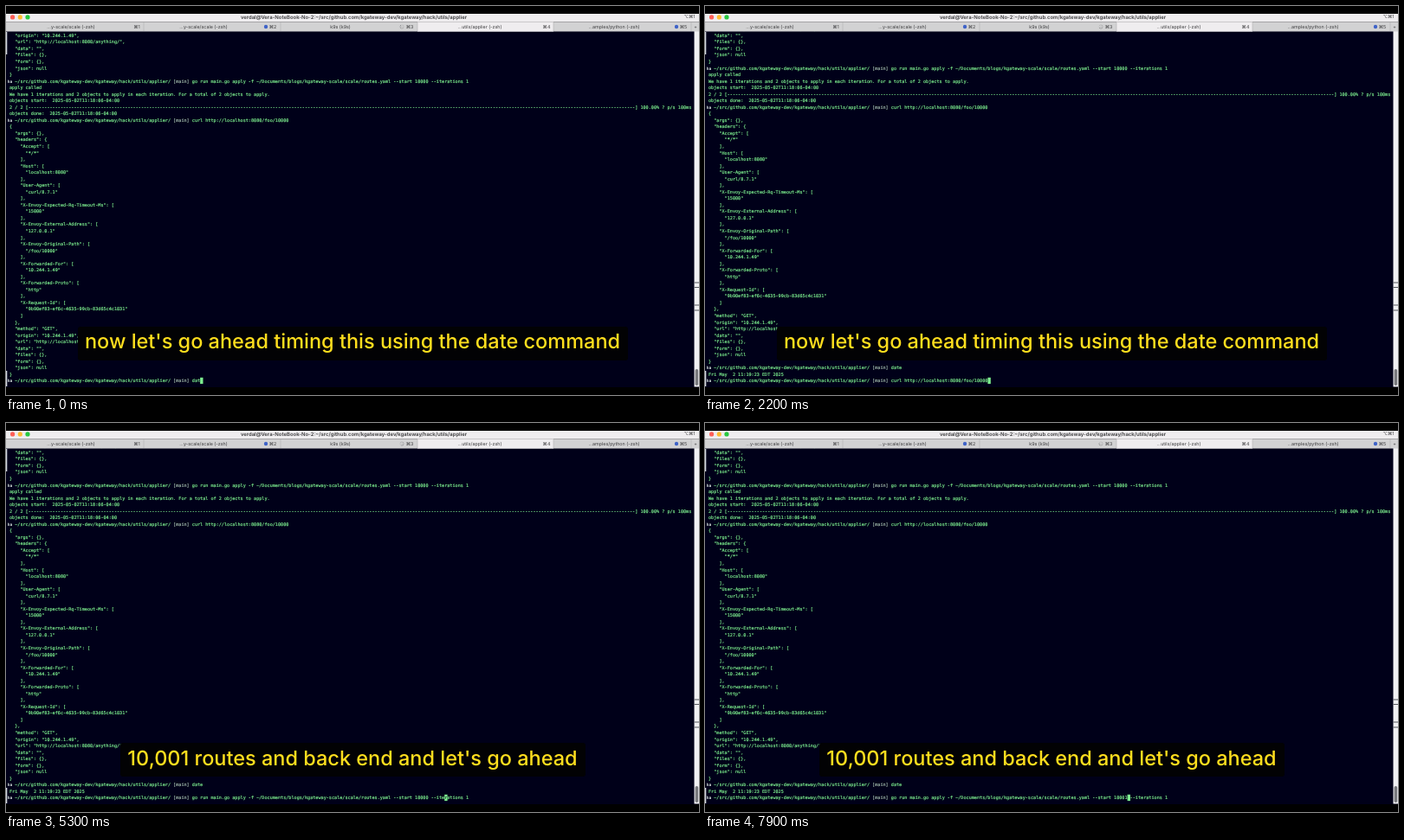
Write an HTML page that moves like this. It is 800 px wide and 450 px high and loops after 8 s.

```html
<!DOCTYPE html>
<html lang="en">
<head>
<meta charset="utf-8">
<title>Terminal</title>
<style>
html, body { margin: 0; width: 100%; height: 100%; overflow: hidden; background: #000; }
svg { display: block; width: 800px; height: 450px; }
text { white-space: pre; text-rendering: geometricPrecision; }
/* Terminal text is set ten times larger and scaled down for exact advances */
.term { font: 51.49px "DejaVu Sans Mono", monospace; fill: #7df08f; stroke: #7df08f; stroke-width: 1.6px; }
.branch { fill: #9fb8a8; stroke: #9fb8a8; }
.mark { font-size: 46px; font-weight: 700; fill: #d8e4e0; stroke: none; }
.under { fill: #000019; stroke: none; }
.ui { font: 5.35px Inter, sans-serif; fill: #3c3c3e; text-anchor: middle; }
.title { font-size: 5.95px; font-weight: 600; }
.caption { font: 500 23.5px Inter, sans-serif; fill: #ffde1e; text-anchor: middle; }
</style>
</head>
<body>
<svg id="stage" viewBox="0 0 800 450"></svg>
<script>
const LOOP = 8000, CW = 3.1, LH = 7.54, X0 = 4, Y0 = 35.8, LAST = 53;
const PATH = '~/src/github.com/kgateway-dev/kgateway/hack/utils/applier/';
const CMD_COL = 2 + PATH.length + 8;
const APPLY = 'go run main.go apply -f ~/Documents/blogs/kgateway-scale/scale/routes.yaml --start 10000 --iterations 1';
const CURL = 'curl http://localhost:8080/foo/10000';

const stage = document.getElementById('stage');

function add(parent, tag, attrs = {}, text) {
  const el = document.createElementNS('http://www.w3.org/2000/svg', tag);
  for (const k in attrs) el.setAttribute(k, attrs[k]);
  if (text !== undefined) el.textContent = text;
  parent.appendChild(el);
  return el;
}
const rect = (p, x, y, width, height, fill, rx = 0) => add(p, 'rect', { x, y, width, height, fill, rx });
const dot = (p, cx, cy, r, fill) => add(p, 'circle', { cx, cy, r, fill });
const label = (p, x, y, text, cls = '') => add(p, 'text', { x, y, class: 'ui ' + cls }, text);
const col = n => X0 + n * CW;
const rowY = n => Y0 + n * LH;
const place = (x, n) => `translate(${x} ${rowY(n)}) scale(.1)`;

function line(parent, n, text, x = X0, cls = '') {
  return add(parent, 'text', { transform: place(x, n), class: 'term ' + cls }, text);
}

// Prompt row; returns the element holding the command
function prompt(parent, n, cmd) {
  line(parent, n, 'ha', 1.8, 'mark');
  const t = line(parent, n, '', col(2));
  add(t, 'tspan', {}, PATH);
  add(t, 'tspan', { class: 'branch' }, ' [main] ');
  return add(t, 'tspan', {}, cmd);
}

// Terminal history
const header = (name, value) => [`    "${name}": [`, `      "${value}"`, '    ],'];
const tail = [
  '  "origin": "10.244.1.49",', '  "url": "http://localhost:8080/anything/",',
  '  "data": "",', '  "files": {},', '  "form": {},', '  "json": null', '}'
];
const log = [
  ...tail,
  { cmd: APPLY },
  'apply called',
  'We have 1 iterations and 2 objects to apply in each iteration. For a total of 2 objects to apply.',
  'objects start:  2025-05-02T11:18:06-04:00',
  '2 / 2 [' + '-'.repeat(226) + '] 100.00% ? p/s 100ms',
  'objects done:  2025-05-02T11:18:06-04:00',
  { cmd: CURL },
  '{', '  "args": {},', '  "headers": {',
  ...header('Accept', '*/*'),
  ...header('Host', 'localhost:8080'),
  ...header('User-Agent', 'curl/8.7.1'),
  ...header('X-Envoy-Expected-Rq-Timeout-Ms', '15000'),
  ...header('X-Envoy-External-Address', '127.0.0.1'),
  ...header('X-Envoy-Original-Path', '/foo/10000'),
  ...header('X-Forwarded-For', '10.244.1.49'),
  ...header('X-Forwarded-Proto', 'http'),
  ...header('X-Request-Id', '9b90ef83-ef6c-4635-99cb-83d65c4c1031').slice(0, 2), '    ]',
  '  },', '  "method": "GET",',
  ...tail
];
const dateRows = [{ cmd: 'date' }, 'Fri May  2 11:19:23 EDT 2025'];

rect(stage, 0, 0, 800, 450, '#000');
rect(stage, 0, 29, 800, 412, '#000019');
const clip = add(add(stage, 'defs'), 'clipPath', { id: 'screen' });
rect(clip, 0, 29.5, 794, 411, '#fff');
const screen = add(stage, 'g', { 'clip-path': 'url(#screen)' });
const history = add(screen, 'g');
const fresh = add(history, 'g');
const put = (g, item, n) => item.cmd ? prompt(g, n, item.cmd) : line(g, n, item);
log.forEach((item, n) => put(history, item, n));
dateRows.forEach((item, n) => put(fresh, item, LAST + n));
const live = prompt(screen, LAST, '');
const cursor = rect(screen, 0, rowY(LAST) - 5.6, 3.4, 7.3, '#7df08f');
const under = line(screen, LAST, '', 0, 'under');

// Window edges
rect(stage, 0, 30, 1.3, 26, '#d5dae0');
rect(stage, 0, 422, 1.3, 18, '#d5dae0');
rect(stage, 794.5, 29, 5.5, 411.5, '#f1f1f3');
for (const y of [319.5, 325, 345.5, 351.5]) rect(stage, 794.5, y, 5.5, 1, '#55575c');
rect(stage, 795.6, 420, 3.6, 19, '#77787c', 1.8);

// Title bar and tabs
rect(stage, 0, 9, 800, 9.5, '#efedef');
['#ff5f57', '#febc2e', '#28c840'].forEach((c, i) => dot(stage, 7.6 + i * 8.7, 12.9, 2.6, c));
label(stage, 401.5, 14.7, 'verdal@Vera-NoteBook-No-2:' + PATH.slice(0, -1), 'title');
label(stage, 789, 14.4, '⌥⌘1');
rect(stage, 0, 18.5, 800, 11, '#d2d2d3');
rect(stage, 475, 18.5, 157, 11, '#efedef');
for (const x of [159, 317, 475, 632, 791]) rect(stage, x - 0.3, 19, 0.6, 10, '#b2b2b4');
const tabs = [
  [75, '…y-scale/scale (-zsh)', 151], [228, '…y-scale/scale (-zsh)', 308],
  [386, 'k9s (k9s)', 466], [547, '', 624], [702, '…amples/python (-zsh)', 782]
];
const tabText = tabs.map(([x, text, key], i) => {
  label(stage, key, 25.9, '⌘' + (i + 1));
  return label(stage, x, 25.9, text);
});
dot(stage, 300, 24, 2.2, '#3f63c8');
dot(stage, 774, 24, 2.2, '#3f63c8');
label(stage, 796, 26, '+');
const spinner = add(stage, 'g');
for (let i = 0; i < 8; i++) {
  add(spinner, 'line', {
    x1: 0, y1: -1.2, x2: 0, y2: -2.6, stroke: '#55565a', 'stroke-width': 0.6,
    opacity: 0.2 + i * 0.1, transform: `rotate(${i * 45})`
  });
}

// Captions: start, text, box left, top, width
const captions = [
  [0, "now let's go ahead timing this using the date command", 83, 371, 635],
  [3600, "so this time we're going to load", 216, 370, 369],
  [5000, "10,001 routes and back end and let's go ahead", 132, 370, 537]
].map(([at, text, x, y, w]) => {
  const g = add(stage, 'g');
  rect(g, x, y, w, 39, '#020204', 3);
  add(g, 'text', { x: x + w / 2 - 0.5, y: 396.3, class: 'caption' }, text);
  return { at, g };
});

// Command line edits: start, text, cursor position
const ENTER = 1200, LEFT = 4150, STEP = 138;
const edited = digits => APPLY.replace('10000', digits);
const edits = [
  [0, 'dat', 3], [200, 'date', 4], [ENTER, '', 0],
  [1900, 'date', 4], [2150, CURL, CURL.length], [2500, APPLY, APPLY.length]
];
for (let i = 0; i < 15; i++) edits.push([LEFT + i * STEP, APPLY, APPLY.length - 1 - i]);
edits.push([6400, edited('1000'), 87], [6700, edited('10001'), 88]);

const current = (list, t, start) => list.reduce((a, b) => start(b) <= t ? b : a);
const show = (el, on) => el.setAttribute('visibility', on ? 'visible' : 'hidden');

function draw(t) {
  const [, cmd, pos] = current(edits, t, e => e[0]);
  const x = col(CMD_COL + pos);
  live.textContent = cmd;
  cursor.setAttribute('x', x);
  under.setAttribute('transform', place(x, LAST));
  under.textContent = cmd[pos] || '';

  const done = t >= ENTER;
  history.setAttribute('transform', `translate(0 ${done ? -2 * LH : 0})`);
  show(fresh, done);
  tabText[3].textContent = `…utils/applier (${done && t < 1500 ? 'git' : '-zsh'})`;

  const turn = Math.floor(t / 100) % 8 * 45;
  spinner.setAttribute('transform', `translate(457 24) rotate(${turn})`);

  const active = current(captions, t, c => c.at);
  captions.forEach(c => show(c.g, c === active));
}

const begin = performance.now();
function tick() {
  draw((performance.now() - begin) % LOOP);
  requestAnimationFrame(tick);
}
tick();
</script>
</body>
</html>
```
